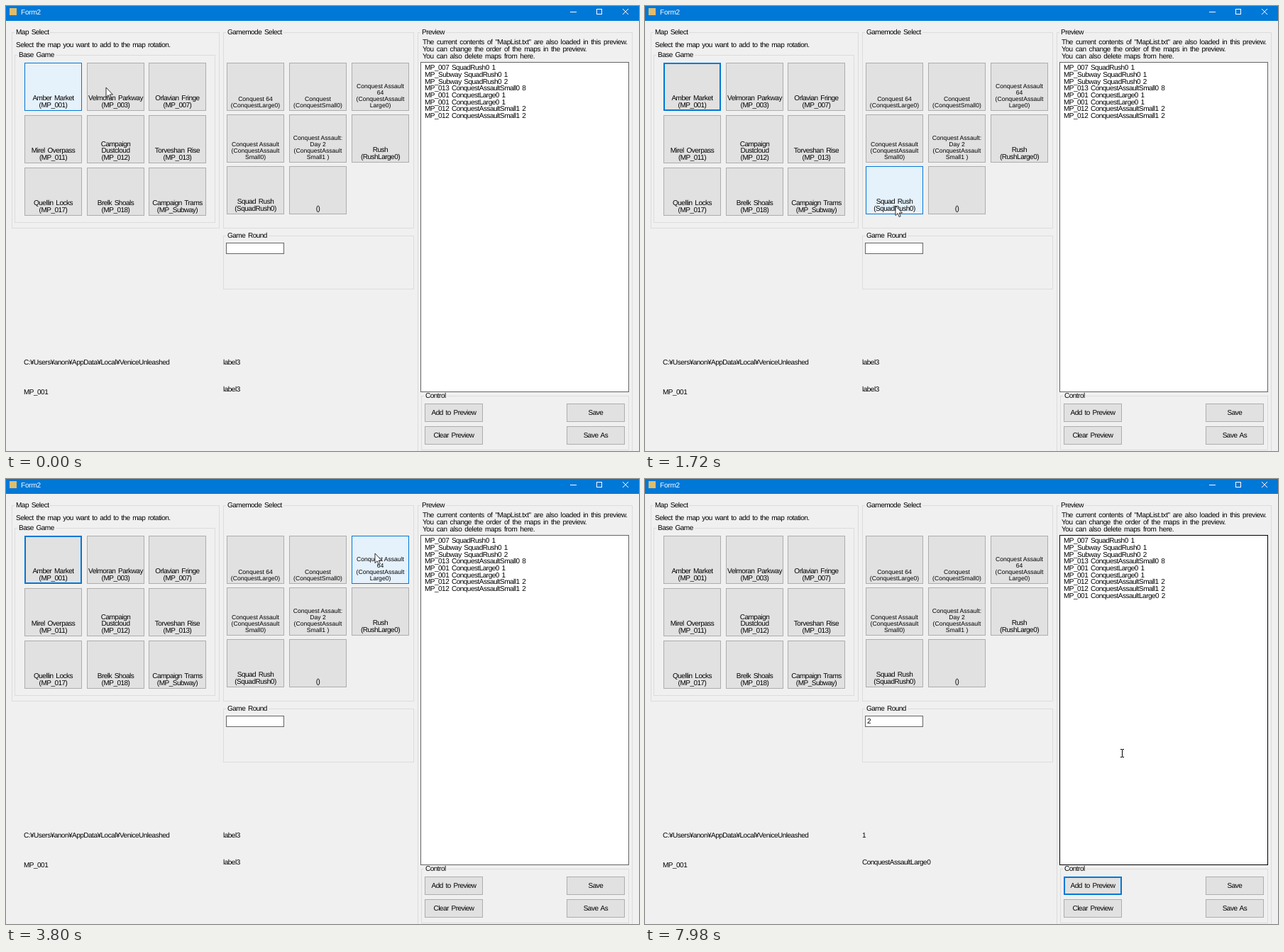
Recreate the animation shown at these times as an HTML page. Size 892 by 628 pixels, loop 8 s.

```html
<!DOCTYPE html>
<html lang="en">
<head>
<meta charset="utf-8">
<title>Form2</title>
<style>
  html, body { margin: 0; width: 100%; height: 100%; overflow: hidden; background: #f0f0f0; }
  svg { display: block; }
  rect, .line { shape-rendering: crispEdges; }
  text { font: 10px "Liberation Sans", Arial, sans-serif; letter-spacing: -.5px; word-spacing: 1.4px;
         text-rendering: geometricPrecision; white-space: pre; }
  .mid { text-anchor: middle; }
  .small { font-size: 8.6px; letter-spacing: 0; word-spacing: 0; }
  .note { letter-spacing: -.4px; word-spacing: 1.6px; }
  .title { fill: #fff; letter-spacing: -.2px; }
</style>
</head>
<body>
<svg id="stage" width="892" height="628" viewBox="0 0 892 628"></svg>
<script>
const LOOP = 8000, REFRESH = 130, BLINK = 530, PITCH = 9.7;
const BLUE = '#0078d7', GREY = '#646464';
const stage = document.getElementById('stage');

function set(el, attrs) {
  for (const key in attrs) el.setAttribute(key, attrs[key]);
}
function add(tag, attrs, content = '') {
  const el = document.createElementNS('http://www.w3.org/2000/svg', tag);
  set(el, attrs);
  el.textContent = content;
  return stage.appendChild(el);
}
const text = (x, y, str, cls = '') => add('text', { x, y, class: cls }, str);
const column = (x, y, lines, cls) => lines.map((line, i) => text(x, y + i * PITCH, line, cls));

function box(x, y, w, h, fill, stroke) {
  const el = add('rect', { x: x + .5, y: y + .5, width: w - 1, height: h - 1, fill, stroke });
  return { el, x, y, w, h };
}

function group(label, x, y, w, h) {
  box(x, y, w, h, 'none', '#dcdcdc');
  const mask = add('rect', { x: x + 4, y: y - 1, height: 3, fill: '#f0f0f0' });
  const caption = text(x + 6, y + 3.1, label);
  set(mask, { width: caption.getComputedTextLength() + 4 });
}

const buttons = [];
function button(label, x, y, w = 81, h = 68) {
  const b = box(x, y, w, h, '#e1e1e1', '#adadad');
  const small = label.startsWith('Conquest');
  const pitch = small ? 9 : PITCH;
  const base = y + (h < 30 ? 16 : 63);
  label.split('|').forEach((line, i, all) =>
    text(x + w / 2, base - (all.length - 1 - i) * pitch, line, small ? 'mid small' : 'mid'));
  buttons.push(b);
  return b;
}
// Three buttons per row
const grid = (labels, x, y, dx, dy) => labels.map((label, i) =>
  button(label, Math.round(x + dx * (i % 3)), y + dy * Math.floor(i / 3)));

// Title bar
add('rect', { width: 892, height: 21, fill: BLUE });
add('rect', { x: 5, y: 3, width: 10, height: 10, fill: '#e0bd6c' });
text(21, 12, 'Form2', 'title');
add('path', { d: 'M795 8.5h9M832.5 4.5h7v7h-7z', fill: 'none', stroke: '#fff', class: 'line' });
add('path', { d: 'M869 4l8 8M877 4l-8 8', stroke: '#fff' });

// Group frames
group('Map Select', 8, 37, 293, 277);
group('Base Game', 12, 69, 283, 237);
group('Gamemode Select', 306, 37, 269, 277);
group('Game Round', 306, 324, 269, 76);
group('Preview', 580, 37, 303, 604);
group('Control', 585, 550, 293, 77);
text(14, 57.7, 'Select the map you want to add to the map rotation.');
column(587, 54.4, [
  'The current contents of "MapList.txt" are also loaded in this preview.',
  'You can change the order of the maps in the preview.',
  'You can also delete maps from here.'], 'note');

// Buttons
const maps = grid(['Amber Market|(MP_001)', 'Velmoran Parkway|(MP_003)', 'Orlavian Fringe|(MP_007)',
  'Mirel Overpass|(MP_011)', 'Campaign|Dustcloud|(MP_012)', 'Torveshan Rise|(MP_013)',
  'Quellin Locks|(MP_017)', 'Brelk Shoals|(MP_018)', 'Campaign Trams|(MP_Subway)'], 26, 80, 87.5, 74);
const modes = grid(['Conquest 64|(ConquestLarge0)', 'Conquest|(ConquestSmall0)',
  'Conquest Assault|64|(ConquestAssault|Large0)', 'Conquest Assault|(ConquestAssault|Small0)',
  'Conquest Assault:|Day 2|(ConquestAssault|Small1 )', 'Rush|(RushLarge0)',
  'Squad Rush|(SquadRush0)', '()'], 311, 80, 88, 73);
const adder = button('Add to Preview', 590, 561, 82, 26);
button('Clear Preview', 590, 593, 82, 26);
button('Save', 790, 561, 82, 26);
button('Save As', 790, 593, 82, 26);
const map = maps[0], mode = modes[2];

// Preview list
const list = box(584, 79, 294, 466, '#fff', GREY);
const newRow = column(590, 90.1, ['MP_007 SquadRush0 1', 'MP_Subway SquadRush0 1', 'MP_Subway SquadRush0 2',
  'MP_013 ConquestAssaultSmall0 8', 'MP_001 ConquestLarge0 1', 'MP_001 ConquestLarge0 1',
  'MP_012 ConquestAssaultSmall1 2', 'MP_012 ConquestAssaultSmall1 2',
  'MP_001 ConquestAssaultLarge0 2']).pop();

// Round field and labels
const field = box(310, 334, 82, 16, '#fff', GREY);
const typed = text(313, 345.2, '2');
const caret = add('rect', { y: 337, width: 1, height: 10 });
text(25, 506.2, 'C:¥Users¥anon¥AppData¥Local¥VeniceUnleashed');
text(25, 548, 'MP_001');
const countLabel = text(306, 506.2, '');
const modeLabel = text(306, 543.6, '');

// Pointers
const arrow = add('path', { d: 'M0 0V13.6L3.1 10.7L5.2 15.6L7.2 14.7L5.2 10H9.4Z',
  fill: '#fff', stroke: '#000', 'stroke-width': .8 });
const beam = add('path', { d: 'M-2.5 -5.5H-.5L0 -5L.5 -5.5H2.5M0 -5V5M-2.5 5.5H-.5L0 5L.5 5.5H2.5',
  fill: 'none', stroke: '#000' });

// Pointer stops: time, x, y; the pointer eases from one to the next
const stops = [
  [-130, 66, 110], [0, 141, 115],       // leaves the chosen map
  [780, 451, 168], [1170, 452, 190],    // rests on a mode
  [1690, 353, 282], [2210, 348, 295],   // looks at another
  [3000, 600, 140], [3250, 572, 125],   // overshoots into the list
  [3770, 520, 105], [4550, 520, 105],   // picks the mode
  [4810, 335, 342], [6370, 335, 342],   // fills in the round
  [6630, 475, 472],
  [7280, 635, 574], [7670, 635, 574],   // adds the row
  [7930, 672, 387],
];
const MODE_DOWN = 4050, MODE_UP = 4190, FIELD_CLICK = 5140, TYPE = 6470, ADD_DOWN = 7560, ADD_UP = 7710;

function pointer(t) {
  const i = Math.max(1, stops.findIndex(stop => stop[0] >= t));
  const [t0, x0, y0] = stops[i - 1], [t1, x1, y1] = stops[i];
  const u = (t - t0) / (t1 - t0), k = u * u * (3 - 2 * u);
  return [x0 + (x1 - x0) * k, y0 + (y1 - y0) * k];
}
const inside = (b, [x, y]) => x >= b.x && x < b.x + b.w && y >= b.y && y < b.y + b.h;
const within = (t, from, to) => t >= from && t < to;
const show = (el, on) => el.setAttribute('visibility', on ? 'visible' : 'hidden');

function paintButton(b, hot, focused, pressed) {
  const edge = focused && !hot && !pressed ? 2 : 1;
  set(b.el, {
    x: b.x + edge / 2, y: b.y + edge / 2, width: b.w - edge, height: b.h - edge,
    'stroke-width': edge,
    fill: pressed ? '#cce4f7' : hot ? '#e5f1fb' : '#e1e1e1',
    stroke: pressed ? '#005499' : hot || focused ? BLUE : '#adadad',
  });
}

function draw(time) {
  const t = Math.floor(time / REFRESH) * REFRESH;
  const at = pointer(t), before = pointer(t - REFRESH);
  const focus = time < MODE_DOWN ? map : time < FIELD_CLICK ? mode : time < ADD_DOWN ? field : adder;
  const pressed = within(time, MODE_DOWN, MODE_UP) || within(time, ADD_DOWN, ADD_UP);

  for (const b of buttons) paintButton(b, inside(b, before), b === focus, pressed && b === focus);
  set(list.el, { stroke: inside(list, before) ? '#000' : GREY });
  set(field.el, { stroke: focus === field ? BLUE : inside(field, at) ? '#333' : GREY });

  const hasText = time >= TYPE;
  const blinkOn = Math.floor((time - (hasText ? TYPE : FIELD_CLICK)) / BLINK) % 2 === 0;
  set(caret, { x: hasText ? 318 : 313 });
  show(caret, focus === field && blinkOn);
  show(typed, hasText);
  show(newRow, time >= ADD_UP);
  countLabel.textContent = time >= ADD_UP ? '1' : 'label3';
  modeLabel.textContent = time >= MODE_UP ? 'ConquestAssaultLarge0' : 'label3';

  const editing = inside(list, at) || inside(field, at);
  show(arrow, !editing);
  show(beam, editing);
  set(arrow, { transform: `translate(${at})` });
  set(beam, { transform: `translate(${Math.round(at[0]) + .5} ${Math.round(at[1])})` });
}

const start = performance.now();
function tick(now) {
  draw(Math.max(0, now - start) % LOOP);
  requestAnimationFrame(tick);
}
draw(0);
requestAnimationFrame(tick);
</script>
</body>
</html>
```
